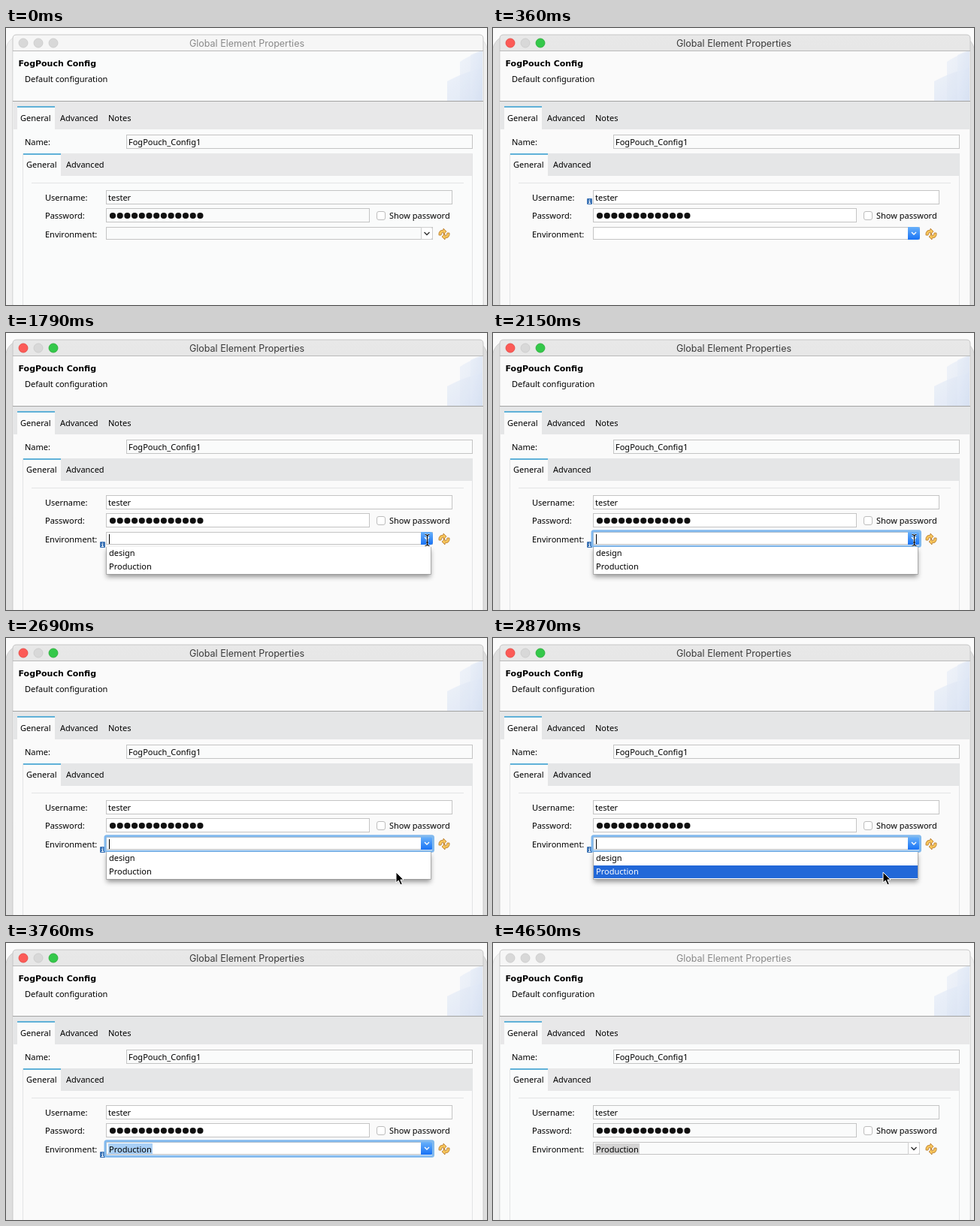
Animation, 640 px wide and 369 px high, one loop 4750 ms. Source, as an HTML page:

```html
<!DOCTYPE html>
<html lang="en">
<head>
<meta charset="utf-8">
<title>Global Element Properties</title>
<style>
  html, body { margin: 0; width: 100%; height: 100%; overflow: hidden; background: #fff; }
  svg { display: block; width: 640px; height: 369px; }
  text { font: 11px "Noto Sans", sans-serif; fill: #000; white-space: pre; }
  .heading { font: bold 11px "DejaVu Sans", sans-serif; }
  .title { font: 12.5px Inter, sans-serif; fill: #8a8a8a; text-anchor: middle; }
  .backdrop { fill: #efefef; stroke: #e2e2e2; }
  .bar { fill: #f6f6f6; }
  .light { fill: #d8d8d8; stroke: #c9c9c9; stroke-width: .8; }
  .panel { fill: #fafbfb; }
  .strip { fill: #e8e8e9; }
  .accent { fill: #5fb1d8; }
  .field { fill: #fff; stroke: #c4c4c4; }
  .readonly, .idle .field { fill: #fafbfb; }
  .active .title { fill: #3b3b3b; }
  .active .backdrop { fill: #dedede; stroke: #d0d0d0; }
  .active .bar { fill: url(#barFill); }
  .active .red { fill: #fc5b57; stroke: #e2443f; }
  .active .green { fill: #34c84a; stroke: #27aa35; }
  .active .strip { fill: #e5e6e7; }
  .active .panel { fill: #fafafa; }
  .selection { fill: #d4d4d4; }
  .active .selection { fill: #a9cff6; }
  .ring { fill: none; stroke: #81b9ee; stroke-width: 3; }
</style>
</head>
<body>
<svg id="stage" class="idle" viewBox="0 0 640 369">
  <defs>
    <linearGradient id="barFill" x2="0" y2="1">
      <stop stop-color="#e8e8e8"/><stop offset="1" stop-color="#d2d2d2"/>
    </linearGradient>
    <linearGradient id="buttonFill" x2="0" y2="1">
      <stop stop-color="#69b1fa"/><stop offset="1" stop-color="#1872f5"/>
    </linearGradient>
    <linearGradient id="bannerFill" x2="1" y2="1">
      <stop stop-color="#e5ecf8"/><stop offset="1" stop-color="#cddaf0"/>
    </linearGradient>
    <filter id="menuShadow" x="-5%" y="-20%" width="110%" height="160%">
      <feDropShadow dx="0" dy="4" stdDeviation="3" flood-opacity=".4"/>
    </filter>
  </defs>

  <!-- window frame -->
  <rect width="640" height="369" fill="#fbfbfb"/>
  <rect class="backdrop" x="-.5" y="9.5" width="641" height="400" rx="22"/>
  <rect width="640" height="9" fill="#fbfbfb"/>
  <path class="bar" d="M9 369V14Q9 9 14 9H630Q635 9 635 14V369Z" stroke="#c6c6c6"/>
  <circle class="light red" cx="23" cy="20" r="6"/>
  <circle class="light" cx="43" cy="20" r="6"/>
  <circle class="light green" cx="63" cy="20" r="6"/>
  <text class="title" x="320.5" y="24.7">Global Element Properties</text>
  <rect class="panel" x="9.5" y="31" width="625" height="338"/>
  <path d="M9 30.5H635" stroke="#b9b9b9"/>

  <!-- header -->
  <g fill="url(#bannerFill)" opacity=".8">
    <path d="M587 97V71Q609 59 634 53V97Z" opacity=".75"/>
    <path d="M604 97V45Q617 36 634 31V97Z" opacity=".65"/>
    <path d="M618 97V36Q624 33 630 31H634V97Z" opacity=".75"/>
  </g>
  <text class="heading" x="16.5" y="51">FogPouch Config</text>
  <text x="25" y="72">Default configuration</text>
  <path d="M9 97.5H635" stroke="#a3a3a3"/>

  <!-- tabs -->
  <rect class="strip" x="10" y="98" width="624" height="37"/>
  <rect class="panel" x="15" y="105" width="50" height="30"/>
  <rect class="accent" x="15" y="104" width="50" height="2"/>
  <text x="19" y="124">General</text>
  <text x="72" y="124">Advanced</text>
  <text x="136" y="124">Notes</text>
  <text x="25" y="156">Name:</text>
  <rect class="field readonly" x="160.5" y="142.5" width="460" height="18"/>
  <text x="163" y="156">FogPouch_Config1</text>
  <rect class="strip" x="22" y="167" width="599" height="30"/>
  <rect class="panel" x="23" y="168" width="50" height="29"/>
  <rect class="accent" x="23" y="167" width="50" height="2"/>
  <path d="M22.5 168V369M620.5 168V369M34 206.5H609" stroke="#e3e4e5"/>
  <text x="27" y="186">General</text>
  <text x="80" y="186">Advanced</text>

  <!-- form -->
  <text x="52" y="230">Username:</text>
  <text x="52" y="254">Password:</text>
  <text x="52" y="279">Environment:</text>
  <rect class="field" x="133.5" y="216.5" width="460" height="18"/>
  <rect class="field" x="133.5" y="240.5" width="350" height="18"/>
  <text x="136" y="230">tester</text>
  <path d="M142 250h117" stroke="#111" stroke-width="8.2" stroke-linecap="round" stroke-dasharray="0 9.7"/>
  <rect x="493.5" y="244.5" width="11" height="11" rx="2.5" fill="#fff" stroke="#bdbdbd"/>
  <text x="510" y="254">Show password</text>
  <rect class="field" x="133.5" y="265.5" width="434" height="16"/>
  <g id="activeButton">
    <path d="M552 265H565Q568 265 568 268V279Q568 282 565 282H552Z" fill="url(#buttonFill)"/>
    <path d="M557 272l3 3 3-3" fill="none" stroke="#fff" stroke-width="1.4"/>
  </g>
  <g id="idleButton">
    <path d="M552.5 265.5H565Q567.5 265.5 567.5 268V279Q567.5 281.5 565 281.5H552.5Z" fill="#fff" stroke="#cfcfcf"/>
    <path d="M556.5 272l3.5 3.5 3.5-3.5" fill="none" stroke="#333" stroke-width="1.4"/>
  </g>
  <g fill="#f7c65b" stroke="#b5762a" stroke-width=".8" stroke-linejoin="round">
    <path id="curl" d="M576 276V273Q577 269 582 269V267L586 271L582 275V272Q579 272 579 276Z"/>
    <use href="#curl" transform="rotate(180 583 274.5)"/>
  </g>
  <g id="info">
    <rect x="125" y="227" width="7" height="8" rx="1" fill="#3c73b5"/>
    <path d="M128.5 228.3v1.2M127.5 230.5h1v2.8M127 233.5h3" fill="none" stroke="#fff"/>
  </g>
  <rect id="wideRing" class="ring" x="130" y="261" width="440" height="25.5" rx="3" opacity=".45"/>
  <rect id="ring" class="ring" x="132" y="263.8" width="436.5" height="20.4" rx="2"/>
  <path id="caret" d="M137.5 268V281" stroke="#000"/>
  <g id="chosen">
    <rect class="selection" x="136" y="267" width="59" height="14"/>
    <text x="137" y="279">Production</text>
  </g>

  <!-- drop-down list -->
  <g id="menu">
    <rect x="134" y="285" width="431" height="36" fill="#fff" filter="url(#menuShadow)"/>
    <path d="M133.5 285V321.5H565.5V285" fill="none" stroke="#9a9a9a" stroke-width=".7"/>
    <rect id="highlight" x="134" y="303" width="431" height="17" fill="#2268d8"/>
    <text x="137" y="297">design</text>
    <text id="option" x="137" y="315">Production</text>
  </g>

  <!-- pointers, drawn around their hot spots -->
  <g id="beam" fill="none">
    <path id="beamShape" d="M-3-7.5Q0-7.5 0-5Q0-7.5 3-7.5M0-5V5M-3 7.5Q0 7.5 0 5Q0 7.5 3 7.5M-1.5 3H1.5" stroke="#fff" stroke-width="2.4" opacity=".8"/>
    <path d="M-3-7.5Q0-7.5 0-5Q0-7.5 3-7.5M0-5V5M-3 7.5Q0 7.5 0 5Q0 7.5 3 7.5M-1.5 3H1.5" stroke="#000" stroke-width="1.1"/>
  </g>
  <path id="arrow" d="M0 0V14L3.2 11L5.8 16.8L8.3 15.7L5.8 10H10Z" fill="#000" stroke="#fff"/>
</svg>
<script>
  const LOOP = 4750;
  const stage = document.getElementById('stage');
  const part = id => document.getElementById(id);
  const show = (id, on) => { part(id).style.display = on ? '' : 'none'; };

  // [start ms, pointer, x, y]
  const pointerSteps = [
    [0], [720, 'beam', 567, 278], [900, 'beam', 567, 270], [1080, 'beam', 566.5, 265],
    [1250, 'beam', 565, 267], [1430, 'beam', 563.5, 271], [1610, 'beam', 560.5, 276],
    [2330, 'arrow', 538, 295], [2510, 'arrow', 529, 302], [2690, 'arrow', 519, 312],
    [3400, 'arrow', 518, 314], [3580, 'arrow', 554, 359], [3760]
  ];

  function draw(t) {
    const during = (from, to) => t >= from && t < to;
    const active = during(360, 4650);
    const open = during(1790, 3040);
    const highlighted = t >= 2870;

    stage.setAttribute('class', active ? 'active' : 'idle');
    show('activeButton', active);
    show('idleButton', !active);
    show('info', active);
    part('info').setAttribute('transform', `translate(0 ${t < 1790 ? 0 : 51})`);
    show('wideRing', during(1970, 2150));
    show('ring', during(2150, 4650));
    show('caret', open);
    show('chosen', t >= 3040);
    show('menu', open);
    show('highlight', highlighted);
    part('option').style.fill = highlighted ? '#fff' : '#000';

    const [, pointer, x, y] = pointerSteps.findLast(step => t >= step[0]);
    for (const id of ['beam', 'arrow']) {
      show(id, id === pointer);
      if (id === pointer) part(id).setAttribute('transform', `translate(${x} ${y})`);
    }
  }

  const start = performance.now();
  function tick() {
    draw((performance.now() - start) % LOOP);
    requestAnimationFrame(tick);
  }
  tick();
</script>
</body>
</html>
```
